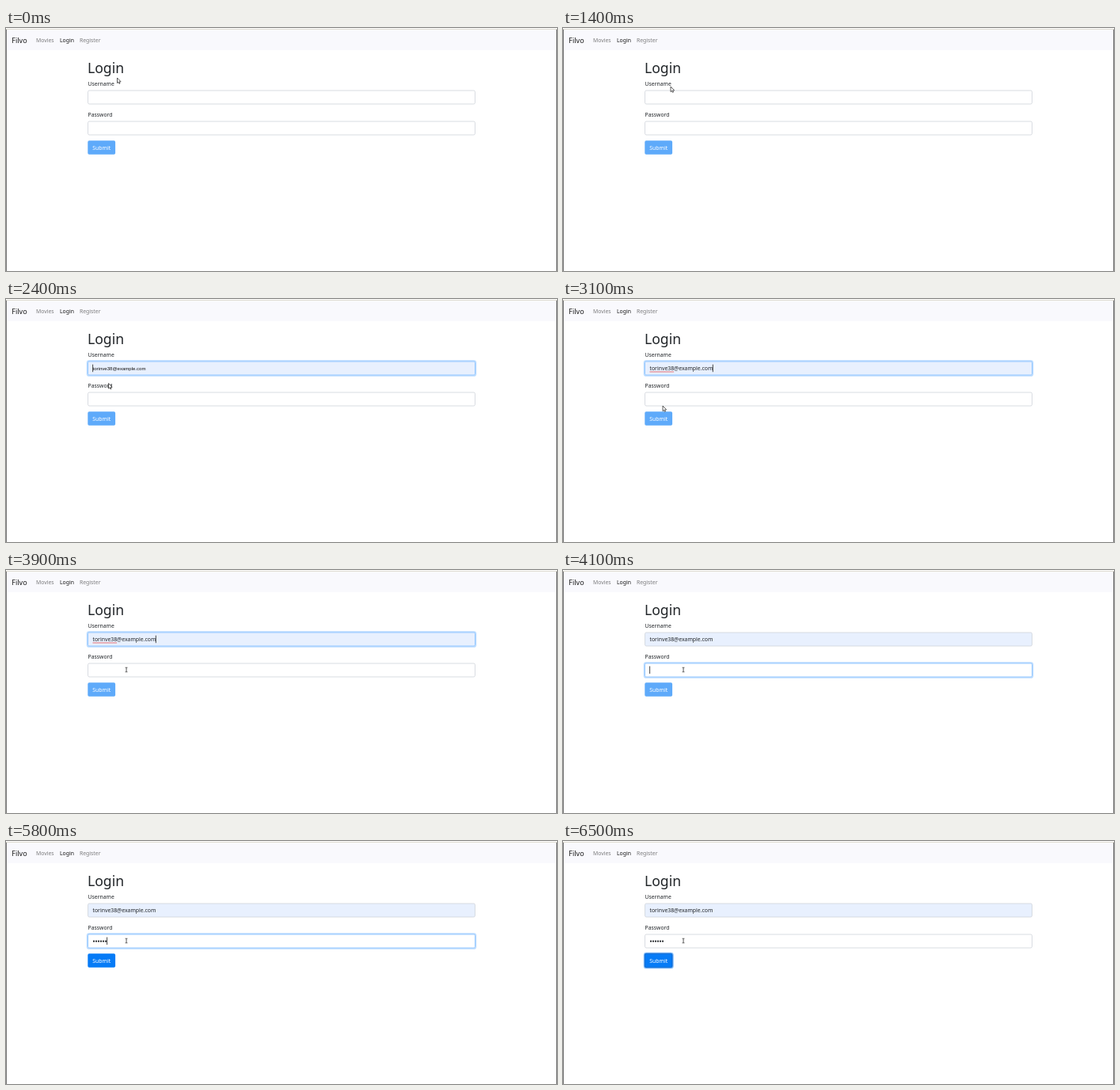
Write an HTML page with a canvas that moves like this. It is 696x307 px and loops after 8 s.

```html
<!DOCTYPE html>
<html lang="en">
<head>
<meta charset="utf-8">
<title>Login form</title>
<style>
  html, body { margin: 0; width: 100%; height: 100%; overflow: hidden; background: #fff; }
  canvas { display: block; }
</style>
</head>
<body>
<canvas id="stage" width="696" height="307"></canvas>
<script>
const ctx = document.getElementById('stage').getContext('2d');
const LOOP = 8000, STEP = 100;
const SANS = '"Noto Sans", "Open Sans", sans-serif';
const ARIAL = '"Liberation Sans", sans-serif';
const INK = '#212529', MUTED = 'rgba(0,0,0,.5)';
const USER = 'torinve38', EMAIL = USER + '@example.com';
const FIELD = { x: 103.5, w: 489, h: 17 };
const USERNAME_Y = 79, PASSWORD_Y = 118;
const KEY_TIMES = [4700, 4900, 5100, 5300, 5600, 5800];

// Pointer positions: time, shape, x, y
const POINTER = [
  [0, 'arrow', 140.5, 63], [1400, 'arrow', 136, 74],
  [1500, 'beam', 138, 84], [1600, 'beam', 139, 93],
  [1800, 'beam', 136, 72], [1900, 'beam', 135, 80],
  [2200, 'arrow', 133, 91], [2300, 'arrow', 131, 99], [2400, 'arrow', 129.5, 106.5],
  [3000, 'arrow', 129, 119], [3100, 'arrow', 126, 135], [3200, 'arrow', 123, 146],
  [3600, 'arrow', 128, 140], [3700, 'beam', 138, 132],
  [3800, 'beam', 148, 127], [3900, 'beam', 152, 126]
];

const ramp = (t, start, length) => Math.min(1, Math.max(0, (t - start) / length));
const within = (t, from, to) => t >= from && t < to;

function text(str, x, y, size, color = INK, family = SANS, weight = 400) {
  ctx.font = `${weight} ${size}px ${family}`;
  ctx.fillStyle = color;
  ctx.fillText(str, x, y);
  return ctx.measureText(str).width;
}

function roundBox(x, y, w, h, r) {
  ctx.beginPath();
  ctx.roundRect(x, y, w, h, r);
}

function ring(x, y, w, h, color, alpha) {
  if (alpha <= 0) return;
  ctx.save();
  ctx.globalAlpha = alpha;
  ctx.strokeStyle = color;
  ctx.lineWidth = 1.5;
  roundBox(x - 1, y - 1, w + 2, h + 2, 2.6);
  ctx.stroke();
  ctx.restore();
}

function field(y, fill, focus) {
  const { x, w, h } = FIELD;
  const mix = (a, b) => Math.round(a + (b - a) * focus);
  ring(x, y, w, h, 'rgba(0,123,255,.28)', focus);
  roundBox(x, y, w, h, 1.8);
  ctx.fillStyle = fill;
  ctx.fill();
  ctx.lineWidth = 0.8;
  ctx.strokeStyle = `rgb(${mix(206, 128)},${mix(212, 189)},${mix(218, 255)})`;
  ctx.stroke();
}

function caret(x, y) {
  ctx.fillStyle = '#333';
  ctx.fillRect(x, y, 0.9, 9.5);
}

function arrow(x, y) {
  const outline = [[0, 0], [0, 6.6], [1.5, 5.3], [2.5, 7.4], [3.5, 6.9], [2.6, 4.9], [4.6, 4.8]];
  ctx.beginPath();
  outline.forEach(([dx, dy]) => ctx.lineTo(x + dx, y + dy));
  ctx.closePath();
  ctx.fillStyle = '#fff';
  ctx.fill();
  ctx.lineWidth = 0.8;
  ctx.strokeStyle = '#333';
  ctx.stroke();
}

function beam(x, y) {
  ctx.fillStyle = '#444';
  ctx.fillRect(x - 0.4, y - 3, 0.9, 6);
  ctx.fillRect(x - 1.5, y - 3.2, 3, 0.7);
  ctx.fillRect(x - 1.5, y + 2.5, 3, 0.7);
}

function drawPage() {
  ctx.fillStyle = '#fff';
  ctx.fillRect(0, 0, 696, 307);
  ctx.fillStyle = '#f9f9fd';
  ctx.fillRect(0, 2, 696, 26);
  ctx.fillStyle = '#dedbd0';
  ctx.fillRect(0, 1, 696, 1);
  ctx.fillStyle = '#777';
  ctx.fillRect(0, 2, 1, 305);
  ctx.fillRect(695, 2, 1, 305);

  text('Filvo', 7.3, 18.8, 9, '#1a1a1a');
  text('Movies', 38, 18, 6.85, MUTED);
  text('Login', 68, 18, 6.85, '#1a1a1a');
  text('Register', 93, 18, 6.85, MUTED);
  text('Login', 103, 56.5, 17.6, INK, SANS, 500);
  text('Username', 103.5, 72.5, 6.85);
  text('Password', 103.5, 111.8, 6.85);
}

function drawUsername(t) {
  const focus = ramp(t, 1700, 200) * (1 - ramp(t, 3900, 200));
  field(USERNAME_Y, t >= 2200 ? '#e8f0fe' : '#fff', focus);
  if (within(t, 2200, 2800)) text(EMAIL, 109.5, 90, 6.05, '#111', ARIAL);
  if (within(t, 1800, 2800)) caret(109.2, 82.7);
  if (t < 2800) return;

  const width = text(EMAIL, 109.5, 90.2, 6.85);
  if (t >= 4000) return;
  ctx.fillStyle = '#e05050';
  ctx.fillRect(109.5, 91.6, ctx.measureText(USER).width, 0.8);
  if (!within(t, 3200, 3600)) caret(109 + width, 82.7);
}

function drawPassword(t) {
  const focus = ramp(t, 3900, 200) * (1 - ramp(t, 6200, 300));
  const typed = KEY_TIMES.filter(time => t >= time).length;
  field(PASSWORD_Y, '#fff', focus);
  ctx.fillStyle = INK;
  for (let i = 0; i < typed; i++) {
    ctx.beginPath();
    ctx.arc(111 + i * 3, 126.7, 1.1, 0, Math.PI * 2);
    ctx.fill();
  }
  if (within(t, 4000, 4400) || within(t, 4700, 6300)) caret(109.2 + typed * 3, 121.5);
}

function drawSubmit(t) {
  const focus = ramp(t, 6200, 300);
  ring(103.5, 142.5, 34.5, 17, 'rgba(38,143,255,.55)', focus);
  roundBox(103.3, 142.2, 34.8, 17.6, 1.8);
  ctx.fillStyle = t < KEY_TIMES[0] ? '#5eaafa' : '#067bf6';
  ctx.fill();
  if (focus > 0) {
    ctx.lineWidth = 0.8;
    ctx.strokeStyle = `rgba(0,88,190,${focus})`;
    ctx.stroke();
  }
  text('Submit', 109.3, 153.7, 6.85, '#fff');
}

function draw(t) {
  drawPage();
  drawUsername(t);
  drawPassword(t);
  drawSubmit(t);
  const [, shape, x, y] = POINTER.filter(([time]) => t >= time).pop();
  (shape === 'arrow' ? arrow : beam)(x, y);
}

const start = performance.now();
function tick() {
  const t = (performance.now() - start) % LOOP;
  draw(Math.floor(t / STEP) * STEP);
  requestAnimationFrame(tick);
}
tick();
</script>
</body>
</html>
```
